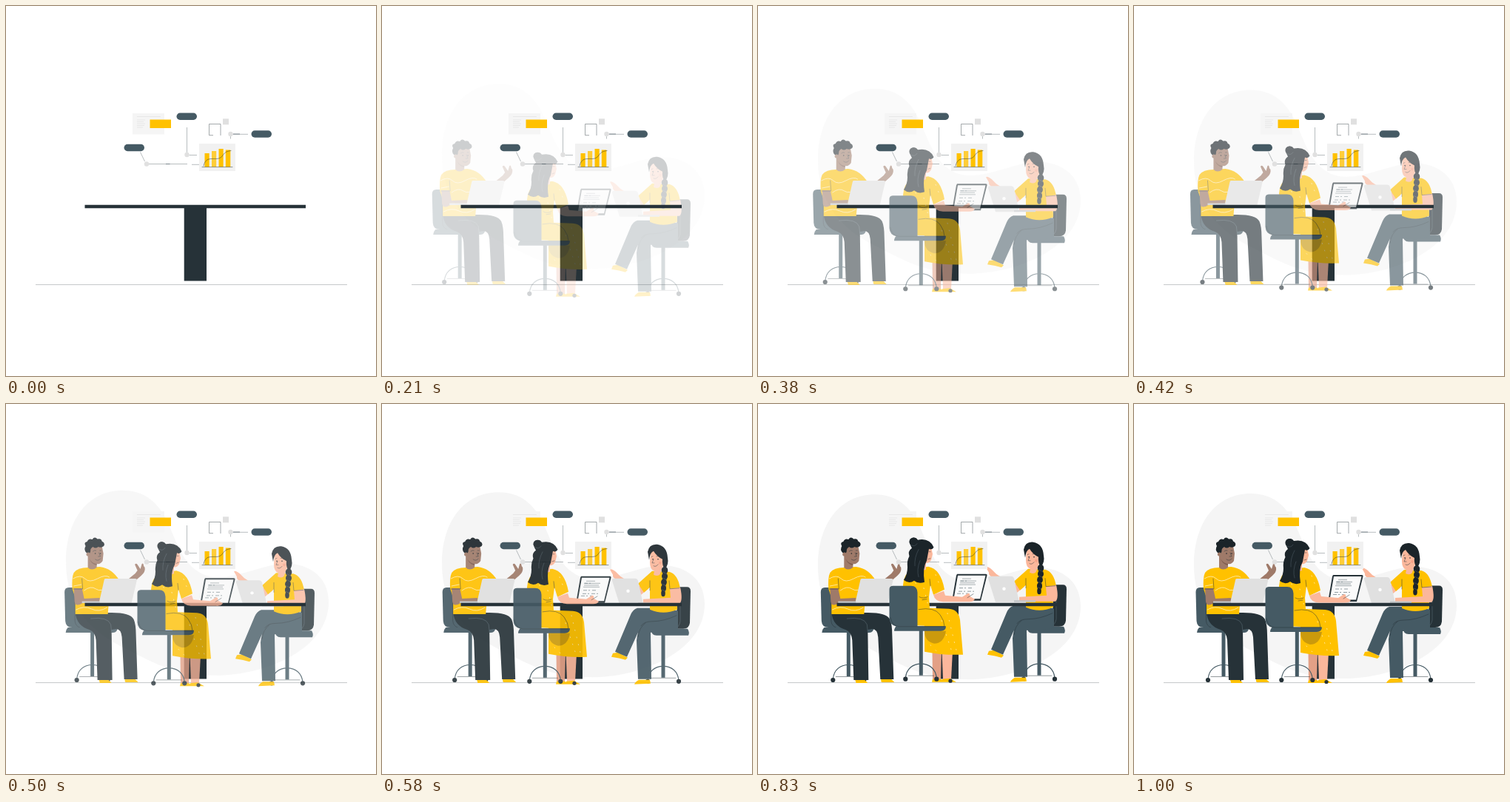
These frames come from a looping animation (500x500 px, 1040 ms). An HTML page:

```html
<!DOCTYPE html>
<html lang="en">
<head>
<meta charset="utf-8">
<title>Team meeting</title>
<style>
  html, body { margin: 0; width: 100%; height: 100%; overflow: hidden; background: #fff; }
  svg { display: block; width: 100vw; height: 100vh; }
  :root { --p: 0; --d: calc((1 - var(--p)) * 20px); }
  .down, .up, .right { opacity: var(--p); }
  .down { transform: translateY(calc(0px - var(--d))); }
  .up { transform: translateY(var(--d)); }
  .right { transform: translateX(calc(0px - var(--d))); }
  .ink { fill: #263238; }
  .slate { fill: #455a64; }
  .gold { fill: #ffc100; }
  .black { fill: #1b2429; }
  .brown { fill: #9f7a69; }
  .skin { fill: #fbb79b; }
  .soft { fill: #e0e0e0; }
  .line { fill: none; stroke: #263238; stroke-width: .5; stroke-linecap: round; stroke-linejoin: round; }
  .wire { fill: none; stroke: #9aa1a4; stroke-width: .7; }
  .pale { fill: none; stroke: #ffe9a8; stroke-width: .9; stroke-linecap: round; }
</style>
</head>
<body>
<svg viewBox="0 0 500 500">
  <defs>
    <g id="base">
      <path d="M-21 372C-20 359-11 352.5 0 352.5S20 359 21 372" fill="none" stroke="#455a64" stroke-width="1.2"/>
      <path d="M-17 368.5H17" class="line"/>
      <rect class="slate" x="-2.5" y="307" width="5" height="61"/>
      <circle class="ink" cx="-21" cy="373" r="3.1"/>
      <circle class="ink" cx="21" cy="373" r="3.1"/>
    </g>
    <rect id="pill" class="slate" width="27.5" height="9.4" rx="4.7"/>
    <circle id="dot" class="soft" r="3.2"/>
  </defs>

  <path class="down" fill="#f5f5f5" d="M158 121C111 121 82 160 81 215C80 268 106 306 152 330C200 354 225 371 285 371C350 371 436 336 436 272C436 238 410 220 379 220C345 220 303 246 271 236C241 226 232 195 219 165C206 137 187 121 158 121Z"/>
  <path d="M40 376.6H461" stroke="#c4c7c8" stroke-width="1"/>

  <!-- man -->
  <g class="right">
    <use href="#base" x="121"/>
    <path class="slate" d="M89 248H104Q110 248 111 254L117 302H94Q85 302 84.500 293L83.500 254Q83.500 248 89 248Z"/>
    <path class="line" d="M97.500 250V293Q98 300 104 302"/>
    <path class="slate" d="M88 302H155Q155 309 149 309H85Q85 305 88 302Z"/>
    <path class="gold" d="M131 376L130 373H143L147 377H131ZM165 375L165 371H178L183 376H166Z"/>
    <path class="ink" d="M98 282H142Q172 281 177 291Q180 298 180 312L182 372H164L161 315Q160 304 153 304L147 305L148 373H128L126 319Q125 308 117 305Q100 300 98 282Z"/>
    <path class="line" style="stroke:#60727b" d="M119 290Q142 287 146 298L147 308"/>
    <path class="brown" d="M147 242L168 238L179 229L182 225L178.500 217Q180 214.500 182 217L186 223L188 216Q190 214 190.500 219L192 221Q193 227 187 232L172 245L147 252Z"/>
    <path class="gold" d="M115 221Q101 221 96 228Q93 234 94 250L98 262V284H142L145 244L152 251L158 239Q148 222 131 220Z"/>
    <path class="brown" d="M96 249H107L110 263L131 262V269H108Q98 275 97 267Z"/>
    <path class="line" d="M107 236L108 250H95"/>
    <path class="pale" d="M95 236Q105 230 111 236T128 236T144 234M96 246L106 244M110 252Q119 245 126 250T143 246M99 278Q110 272 120 277T141 275"/>
    <path class="brown" d="M115 192Q125 185 134 192L136 202L135 212Q132 217 127 216V221Q120 226 115 221Z"/>
    <path d="M117 209Q121 216 127 216V218Q120 217 117 209Z" fill="#7d5c4f"/>
    <path class="black" d="M113 201Q109 197 112 192Q109 187 114 186Q116 181 121 183Q124 178.500 128 182.500Q133 181 134 185.500Q139 188 136.500 192Q133 195 129 193Q125 196 122 193Q118 195 118.500 199L117 203Z"/>
    <circle class="brown" cx="115.500" cy="203" r="2.600"/>
    <path class="line" d="M122 199Q124 197 126 198M131 198L133 198M130 201L132 206H129M125 210Q129 213 132 209"/>
    <circle class="black" cx="125" cy="202" r=".8"/>
    <circle class="black" cx="132" cy="202" r=".8"/>
    <path class="soft" d="M139 236H179Q182 236 181 239L174 269H130L137 238Q137 236 139 236Z"/>
    <path d="M107 266.500H131V269H107Z" fill="#c3c6c8"/>
  </g>

  <!-- woman on the right -->
  <g class="up">
    <use href="#base" x="380"/>
    <path class="ink" d="M400 245.500H412Q417 245.500 417 251L416 294Q415 302 407 302H397Z"/>
    <path class="line" style="stroke:#60727b" d="M403 248V292Q402 299 396 302"/>
    <path class="slate" d="M363 302H413Q416 307 414 311H371Q364 311 363 302Z"/>
    <path class="gold" d="M312 335L319 334L332 341L329 344Q321 341.500 310 340ZM347 371H362L363 376L341 377Q342 374 347 371Z"/>
    <path class="slate" d="M345 274H386L400 278V303Q392 307 363 307L364 370H346L344 318Q345 306 350 298L331 340L315 333L336 283Q339 276 345 274Z"/>
    <path class="line" d="M398 284Q381 292 365 292Q354 292 350 298M356 294Q347 301 346 313"/>
    <path class="skin" d="M354 239L360 248L344 261L318 236Q311 233 312 229L308 222Q310 220 316 225L322 231L345 246Z"/>
    <path class="gold" d="M365 224L346 241L354 253L362 246V276Q380 284 399 276L398 253L403 248Q400 228 388 225Z"/>
    <path class="skin" d="M389 248L403 246Q407 264 402 268H353V262L390 260Z"/>
    <path class="line" d="M388 237L389 248L402 247M362 237V250"/>
    <path class="skin" d="M363 197L378 195L382 212L377 224Q376 233 367 229L368 224Q362 222 362 212Z"/>
    <path class="black" d="M359 198Q361 187 372 188Q385 190 386 206Q388 215 382 222Q378 215 379 208Q371 204 367 197Q362 199 361 209Z"/>
    <g class="black">
      <ellipse cx="382" cy="223" rx="4.300" ry="5"/>
      <ellipse cx="382" cy="231" rx="4" ry="4.800"/>
      <ellipse cx="381" cy="239" rx="3.900" ry="4.800"/>
      <ellipse cx="380.500" cy="247" rx="3.500" ry="4.500"/>
      <ellipse cx="380" cy="254" rx="2.800" ry="4.500"/>
    </g>
    <path class="line" style="stroke:#52616a" d="M379 225L385 228M379 233L385 236M378 241L384 244M378 249L383 251"/>
    <path class="line" d="M364 205L366 204M371 204Q373 203 375 205M367 208L365 213H368M367 217Q370 219 373 215"/>
    <circle class="black" cx="366" cy="208" r=".8"/>
    <circle class="black" cx="373" cy="208" r=".8"/>
    <circle cx="376" cy="213" r="2" fill="#f58f78" opacity=".5"/>
    <path class="soft" d="M313 234H342Q345 234 346 237L353 269H321L311 237Q311 234 313 234Z"/>
    <circle cx="332.500" cy="251" r="2.200" fill="#fff"/>
    <path d="M346 266.500H375V269H346Z" fill="#c3c6c8"/>
  </g>

  <!-- table -->
  <path class="ink" d="M106.500 268.700H405V273.200H271V371.500H240.700V273.200H106.500Z"/>

  <!-- charts and labels -->
  <g>
    <rect x="171" y="145" width="43" height="28.500" fill="#f5f5f5"/>
    <path d="M177 149.500H209M177 154H188M177 156.500H186M177 159H188M177 161.500H187M177 164H185" stroke="#dedede" stroke-width=".6"/>
    <rect class="gold" x="194.500" y="153.500" width="28.500" height="11.500"/>
    <path class="wire" d="M244.500 164V198M247.500 201.500H258M181.500 197.500L187.500 210M193 213.500H245M251 214.300H261M306 173.300H327M303.500 176V179.500"/>
    <path class="wire" style="stroke:#5d6c74" d="M216 213.500H221.500M307 173H316"/>
    <path class="wire" style="stroke:#7d8487" d="M280 174.700H274.500V159.500H290V175"/>
    <rect class="soft" x="293" y="152.300" width="8" height="8"/>
    <use href="#dot" x="244.500" y="201"/>
    <use href="#dot" x="190" y="213.500"/>
    <use href="#dot" x="303.500" y="173"/>
    <use href="#pill" x="230.500" y="144.500"/>
    <use href="#pill" x="159.500" y="186.800"/>
    <use href="#pill" x="331.500" y="168.300"/>
    <rect x="261" y="186" width="49" height="37" fill="#f1f1f1"/>
    <path class="gold" d="M268.500 199H274.700V217.500H268.500ZM287.500 193H293.700V217.500H287.500ZM296.800 194.500H303.300V217.500H296.800Z"/>
    <path d="M278 196H284.200V217.500H278Z" fill="#ffcd38"/>
    <path class="line" d="M265 217.600H306M267 216C269 207 274 206.500 279 206.500S289 207 292 203S297 196 304 195.500"/>
  </g>

  <!-- woman in the middle -->
  <g class="up">
    <path d="M235.500 335H248L247 374H236Z" fill="#e3a086"/>
    <path class="skin" d="M248.500 335H263L261 373H250Z"/>
    <path class="gold" d="M236 373H247L253 377H235ZM249 373L259 372L268 377H248Z"/>
    <path class="gold" d="M207 225Q197 231 196 246L202 300L225 301V336Q250 341 277 340L273 293Q271 279 258 278L232 277L231 262L233 246L237 259L252 252Q247 224 230 221Z"/>
    <path d="M225 308H254Q251 325 238 325Q225 322 225 308Z" fill="#cb9a0c"/>
    <path class="line" d="M217 279Q238 275 246 286Q252 294 252 302M218 262Q223 265 229 262M222 266L228 265M232 238L233 247"/>
    <path class="pale" stroke-dasharray="1 9" d="M240 232L247 250M224 250L230 273M256 284L268 334M248 294L262 336M233 327L242 336M204 238L214 244"/>
    <path class="skin" d="M223 194L234 195L236 204L234 212Q231 217 227 216L227 225Q220 228 217 220Z"/>
    <path class="line" d="M231 201L233 201M230 211L233 210"/>
    <path class="black" d="M208 196Q203 188 207 183Q213 180 216 185Q232 182 237.500 195Q235 199 231 197L228 213Q222 223 225 242Q217 245 211 240Q204 245 197 239Q202 231 202 222Q201 213 204.500 207Q202 200 208 196Z"/>
    <circle class="black" cx="210" cy="187.500" r="5.600"/>
    <path class="line" style="stroke:#52616a" d="M207 192Q212 195 215 190M217 198Q211 209 212 220M219 213Q214 225 217 235"/>
    <path class="ink" d="M269 231H308Q310 231 309.500 233L301 267H264Q262 267 262.500 265L268 233Z"/>
    <path d="M270 233H307.500L300 264.500H264.500Z" fill="#fafafa"/>
    <path d="M276 237.500H288M274 240.500H295M273 243H293M272 245.500H294" stroke="#b7bdc0" stroke-width="1.300"/>
    <path d="M273 240.500H285M272 250H290M271 254.500H294M269 257.500H284" stroke="#66777f" stroke-width=".7" stroke-dasharray="5 2 2 3"/>
    <path class="skin" d="M237 259L251 254L253 260L276 262L284 257Q287 257 286 261L293 265Q291 269 284 268.500H250Q239 268 237 259Z"/>
    <path class="line" d="M283 263L291 258"/>
    <use href="#base" x="220.300"/>
    <circle class="ink" cx="260" cy="375.500" r="2.600"/>
    <path class="slate" d="M182 247H207Q215 247 215.500 256V302H187Q178 300 177.500 291V253Q177 247 182 247Z"/>
    <path class="slate" d="M187 301.500H254Q254 308 247 308H184Q184 304 187 301.500Z"/>
    <path class="line" d="M179 290Q181 301 190 302H252"/>
  </g>
</svg>
<script>
  const LOOP = 1040, FPS = 24, STEPS = 25;
  const bezier = (s, a, b) => 3 * (1 - s) ** 2 * s * a + 3 * (1 - s) * s * s * b + s ** 3;

  // cubic-bezier(.36, -.01, .5, 1.38), solved by bisection
  function ease(x) {
    let lo = 0, hi = 1;
    for (let i = 0; i < 24; i++) {
      const mid = (lo + hi) / 2;
      if (bezier(mid, .36, .5) < x) lo = mid; else hi = mid;
    }
    return bezier(lo, -.01, 1.38);
  }

  // the motion runs in 24 fps steps; the first two are empty
  function draw(now) {
    const step = Math.min(STEPS - 1, Math.floor((now % LOOP + 5) * FPS / 1000));
    const p = step < 2 ? 0 : ease((step + 1) / STEPS);
    document.documentElement.style.setProperty('--p', p.toFixed(4));
  }

  const start = performance.now();
  function tick() {
    draw(performance.now() - start);
    requestAnimationFrame(tick);
  }
  tick();
</script>
</body>
</html>
```
